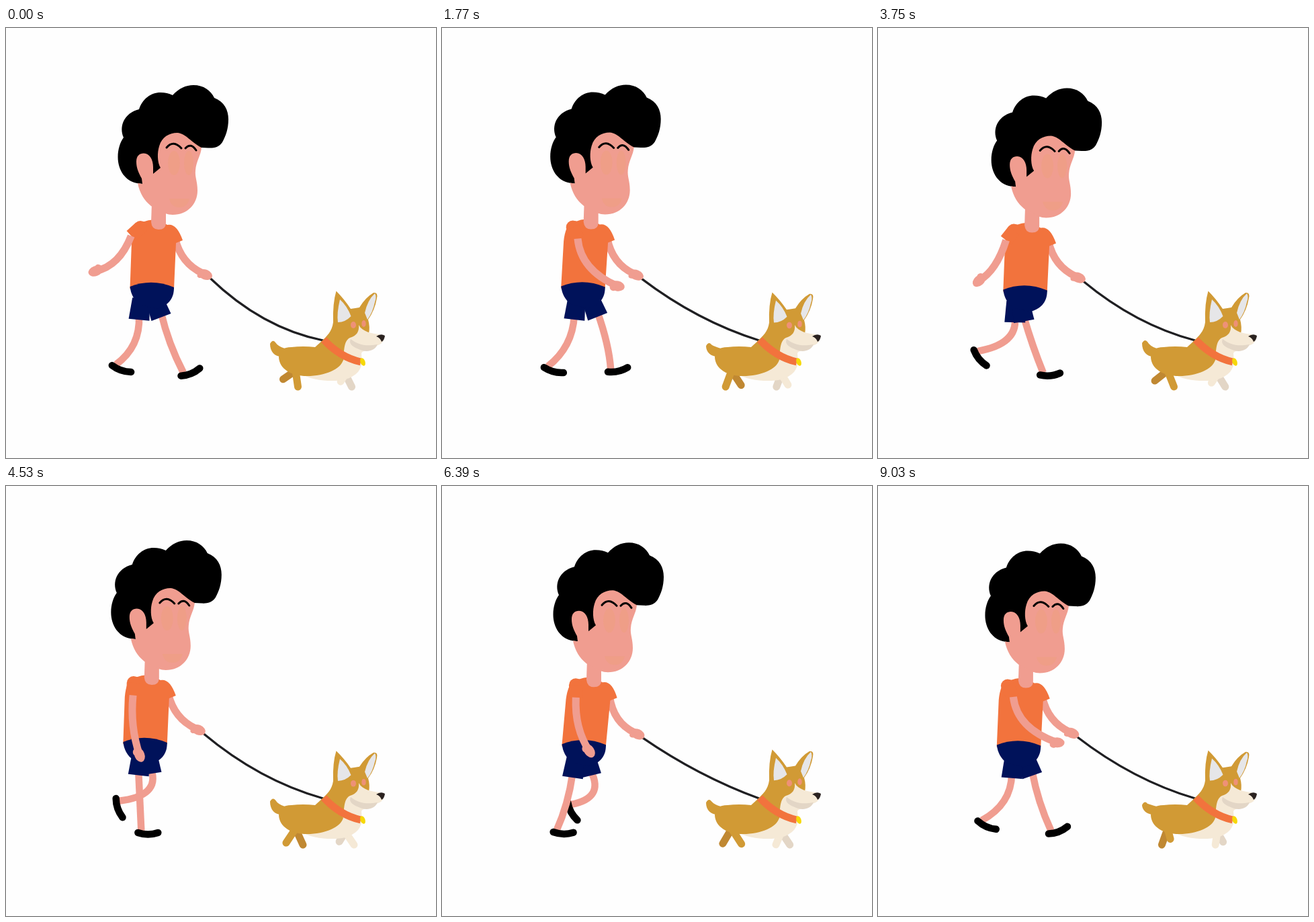
These frames come from a looping animation (640x640 px, 9060 ms). An HTML page with a canvas:

```html
<!DOCTYPE html>
<html>
<head>
<meta charset="utf-8">
<style>
html, body { margin: 0; width: 100%; height: 100%; overflow: hidden; background: #fefefe; }
canvas { display: block; }
</style>
</head>
<body>
<canvas id="stage" width="640" height="640"></canvas>
<script>
const ctx = document.getElementById('stage').getContext('2d');
const LOOP = 9060, FRAME = 30, STRIDE = 1200, TROT = 540, TURN = 2 * Math.PI;
const SKIN = '#f09d90', FLUSH = '#ef9e87', ORANGE = '#f2733d', NAVY = '#00125a', BLACK = '#000';
const TAN = '#d19a35', BROWN = '#c08832', CREAM = '#f5e9d6', GREY = '#e3d6c6', EAR = '#e6e6e8';

const { sin, cos, max, sqrt, PI } = Math;
const rad = deg => deg * PI / 180;
// Periodic curve: mean plus first and second harmonics
const wave = (p, mean, c1, s1, c2 = 0, s2 = 0) =>
  mean + c1 * cos(p) + s1 * sin(p) + c2 * cos(2 * p) + s2 * sin(2 * p);
// Positive half of a cosine that peaks at the given turn
const pulse = (p, peak) => max(0, cos(p - peak * TURN));

function fill(color, d) {
  ctx.fillStyle = color;
  ctx.fill(new Path2D(d));
}
function stroke(color, width, d, cap = 'round') {
  ctx.strokeStyle = color;
  ctx.lineWidth = width;
  ctx.lineCap = cap;
  ctx.stroke(new Path2D(d));
}
function oval(color, x, y, rx, ry, deg = 0) {
  ctx.fillStyle = color;
  ctx.beginPath();
  ctx.ellipse(x, y, rx, ry, rad(deg), 0, 7);
  ctx.fill();
}
function moved(x, y, deg, draw) {
  ctx.save();
  ctx.translate(x, y);
  ctx.rotate(rad(deg));
  draw();
  ctx.restore();
}

// p is the leg's own phase: 0 at heel strike, half a turn at push-off
function legPose(p, ankleX, dy) {
  const lift = max(0, wave(p, 13.25, -6, -24.5, -7.25, -3));
  const strike = pulse(p, 0) ** 4;
  const x = wave(p, 210.5, 16.5, -7, 4);
  return {
    x, y: 433.5 + dy - .12 * (x - 205), tilt: .8 * (205 - x),
    ankleX, ankleY: 513 - lift,
    bend: 5.6 * sqrt(lift) - 6 * strike,
    foot: 1.6 * lift - 22 * strike
  };
}
function leg({ x, y, ankleX, ankleY, bend, foot }) {
  const kneeX = (x + ankleX) / 2 + bend, kneeY = (y + ankleY) / 2 + bend * .35;
  stroke(SKIN, 10.5, `M${x},${y - 6} Q${kneeX},${kneeY} ${ankleX},${ankleY}`, 'butt');
  moved(ankleX, ankleY, foot, () => stroke(BLACK, 10.5, 'M-5,3 Q10,8 25,3'));
}
function trouser({ x, y, tilt }) {
  moved(x, y, tilt, () => fill(NAVY, 'M-15.5,0 L15.5,0 L13,-32 L-13,-32Z'));
}

function head() {
  fill(SKIN, 'M217,260 L216,289 Q217,300 227,300 Q238,300 238,290 L238,265Z');
  fill(BLACK, `M203,232 L195,231 C178,228 166.5,212 166.5,192 C166.5,180 170,170 175,163
    C168,147 175,127 198,121 C203,106 215,96 230,96 Q240,96 248,100 C257,90 268,85 279,85
    C294,85 305,93 310,104 C325,110 331,122 331,136 C331,150 327,161 322,170
    C317,178 308,179 301,178.5 L291,178 L240,215Z`);
  fill(SKIN, `M203,232 L202,224 C197,215 194,208 194,199 C194,190 199,186.5 205,186.5
    C214,187 219,196 219,207 L219,217 L230,208 C225,200 225,185 228,176
    C232,162 243,156 255,156 C268,157 275,170 291,178 C290,190 283,198 282,212
    C281,222 285,228 285,242 C285,262 270,278 248,278 Q242,278 237,276 L216,265
    C206,257 199,246 196,231Z`);
  oval(FLUSH, 250, 201, 9, 18);
  oval(FLUSH, 272, 201, 7, 18);
  fill(FLUSH, 'M243,254 L273,254 Q270,267 258,267 Q246,267 243,254Z');
  stroke(BLACK, 3, 'M239,178 Q249,166 261,179 M267,179 Q275,170 283,182');
}

function nearArm(p, x, y) {
  const swing = wave(p, 0, -42.7, -9.1, -3.2, 1.9);
  const at = (deg, r) => [x + r * sin(rad(deg)), y + r * cos(rad(deg))];
  const sleeve = at(swing - 8 + 6 * cos(p), 18.5);
  const elbow = at(.47 * swing - 7, 65);
  const hand = at(swing, wave(p, 102, -9, -7));
  oval(ORANGE, x, y, 10, 10);
  stroke(ORANGE, 20, `M${x},${y} L${sleeve}`, 'butt');
  stroke(SKIN, 11, `M${sleeve} Q${elbow} ${hand}`, 'butt');
  moved(...hand, 77 - 1.8 * swing, () => {
    oval(SKIN, 0, 0, 11, 7.5);
    oval(SKIN, -6, 4, 5, 4, 25);
  });
}

function man(t) {
  const p = t / STRIDE * TURN, q = p + PI;
  const dx = wave(p, -4.1, 3.1, 5.7, 1);
  const dy = wave(p, -.3, 0, 2.5, .3, 3);
  const lean = -5 * pulse(p, 1 / 3) ** 2;
  const near = legPose(p, wave(p, 193, 54, 16.4, 17, 3), dy);
  const far = legPose(q, wave(q, 197.5, 46, 22.4, 12, -1), dy);

  const handX = 296.5 + dx + lean * .9, handY = 367 + dy - lean * .6;
  const x = handX + 7, y = handY + 5, sag = wave(p, 20, 5, -4, 3);
  stroke('#1f1f22', 3.2, `M${x},${y} Q${(x + 472) / 2 - sag * .25},${(y + 465) / 2 + sag} 472,465`);
  stroke(SKIN, 11, `M${252 + dx + lean * .3},${314 + dy} Q${handX - 36},${handY - 17} ${handX - 4},${handY - 2}`);
  oval(SKIN, handX, handY, 11, 7.5, 22);
  oval(SKIN, handX - 7, handY + 1, 5, 4, -15);

  leg(far);
  leg(near);
  moved(dx, dy, 0, () => {
    ctx.transform(1, 0, lean / 95, 1, -lean * 290 / 95, 0);
    fill(ORANGE, `M187,318 Q188,306 191,299 Q194,287 206,288 Q222,281 240,293
      Q254,290 263,316 L253,320 L250,388 L184.5,388Z`);
  });
  trouser(far);
  trouser(near);
  moved(dx + lean, dy, 0, () => fill(NAVY, `M184.5,385 Q217,372 250,386 C250,402 243,412 225,418
    L200,412 C190,405 186,396 184.5,385Z`));
  nearArm(p, 200 + dx, 297 + dy);
  moved(dx, dy, 0, head);
}

function hindPaw(color, p) {
  const x = 427 + 14 * cos(p - .9 * TURN) + 6 * cos(2 * p - .64 * TURN);
  stroke(color, 11, `M431,510 L${x},${534 - 12 * pulse(p, .6)}`);
}
function frontPaw(color, p) {
  const x = 507 + 11 * cos(p - .4 * TURN);
  stroke(color, 11, `M505,515 L${x},${534 - 9 * pulse(p, .08)}`);
}

function dogHead(bob) {
  ctx.save();
  ctx.translate(0, 460);
  ctx.scale(1, 1 - bob / 68);
  ctx.translate(0, -460);
  fill(TAN, `M469,467 C478,458 485,452 487,438 Q486,410 491.5,391.5 Q503,403 513,418
    Q520,417 526,416 Q535,401 547,394 Q554,393 552,402 Q549,420 539,434
    Q542,445 540,455 L512,462 L504,497Z`);
  fill(EAR, 'M497,404 Q492,425 494,438 Q505,438 513.5,429 Q508,414 497,404Z');
  fill(EAR, 'M549,395 Q552,400 549,408 Q546,423 538,434 L534,424 Q538,405 549,395Z');
  oval('#ee9177', 517, 442, 4, 5);
  oval('#ee9177', 532.5, 440, 3.2, 5);
  ctx.restore();
  fill(CREAM, `M525,442 C530,452 545,455 556,456 L562,464 C560,472 550,473 545,474
    C538,481 530,480 529,484 L530,500 L502,497 C503,475 504,465 512,461 C522,458 526,452 525,442Z`);
  fill(GREY, 'M513,463 C525,472 535,474 553,471 C548,482 535,483 525,478 C514,474 510,469 513,463Z');
  fill('#2a2220', 'M551,459 Q558,454 564,458 Q563,465 559,467 Q557,461 551,459Z');
}

function dog(t) {
  const p = t / TROT * TURN;
  hindPaw(BROWN, p + .54 * TURN);
  frontPaw(GREY, p + .53 * TURN);
  frontPaw(CREAM, p);
  fill(CREAM, 'M438,514 C455,526 490,527 505,523 C522,518 530,508 530,494 L500,488Z');
  hindPaw(TAN, p);
  const tail = 470 + 3 * sin(2 * p - .12 * TURN);
  fill(TAN, `M410,489 C400,489 393,482 393,${tail + 2} Q397,${tail - 5} 401,${tail}
    Q405,474 415,477Z`);
  fill(TAN, `M406,490 C407,480 412,475 425,475 Q442,473 460,475 L471,465 L502,494
    C498,508 475,518 448,518 C425,518 407,508 406,490Z`);
  dogHead(1.6 - 1.6 * cos(p));
  stroke(ORANGE, 11, 'M473,464 Q497,490 528,497', 'butt');
  oval('#f6d808', 531, 497, 3.5, 6, -20);
}

const start = performance.now();
function tick(now) {
  const t = Math.floor(max(0, now - start) % LOOP / FRAME) * FRAME;
  ctx.fillStyle = '#fefefe';
  ctx.fillRect(0, 0, 640, 640);
  man(t);
  dog(t);
  requestAnimationFrame(tick);
}
tick(start);
</script>
</body>
</html>
```
